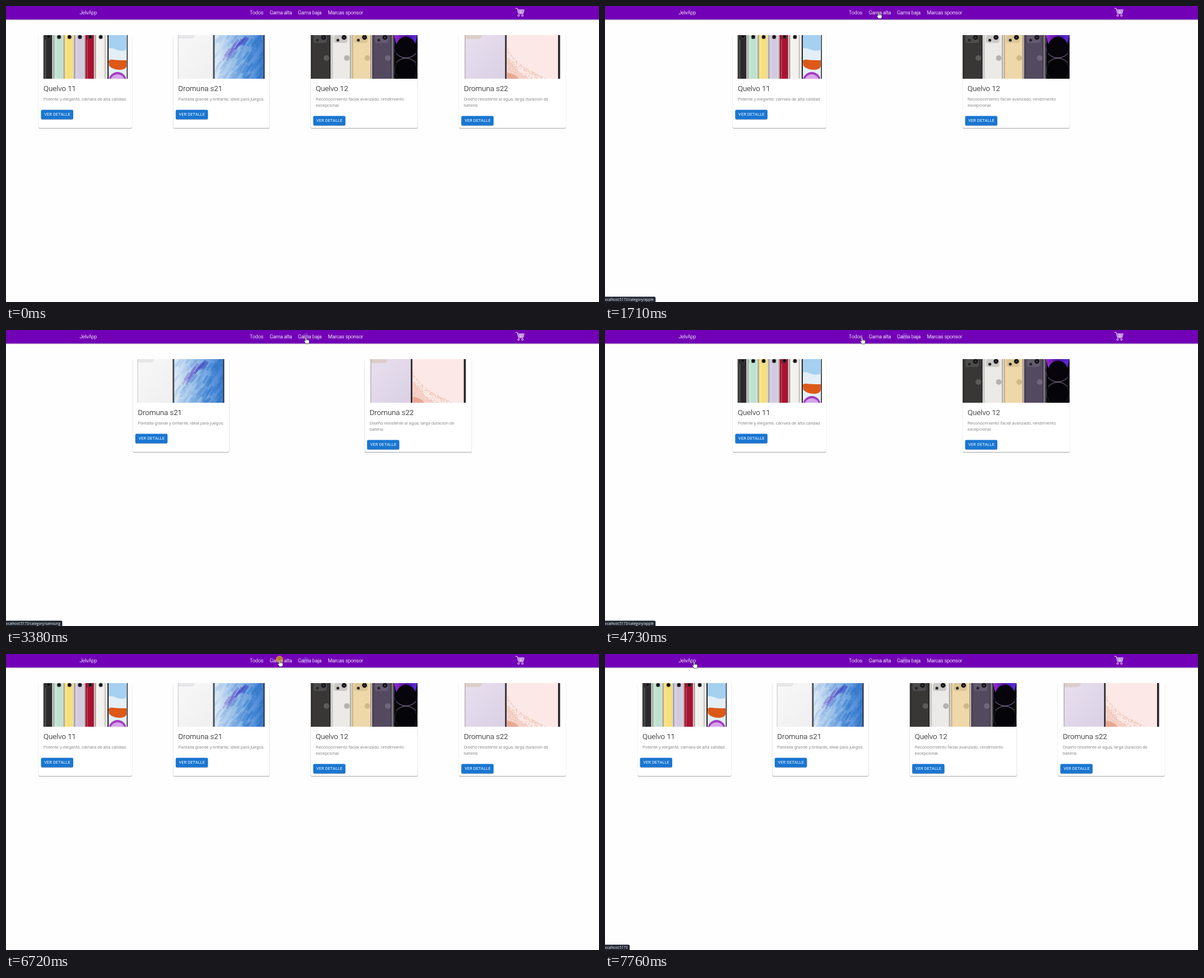
Write an HTML page that moves like this. It is 1058x529 px and loops after 8000 ms.

```html
<!DOCTYPE html>
<html lang="es">
<head>
<meta charset="utf-8">
<style>
  html, body { margin: 0; width: 100%; height: 100%; overflow: hidden; background: #fefefe; }
  #stage { display: block; width: 1058px; height: 529px; font-family: Roboto, sans-serif; font-weight: 300; }
  .title { font-size: 13.29px; fill: #181818; stroke: #181818; stroke-width: .08px; }
  .desc { font-size: 7.75px; letter-spacing: .01071em; fill: #555; }
  .button { font-size: 7.2px; font-weight: 400; letter-spacing: .02857em; fill: #fff; }
  .nav { font-size: 8.86px; fill: #fff; stroke: #fff; stroke-width: .16px; }
  .status { font: 400 6.3px "Open Sans", "Noto Sans", sans-serif; fill: #fff; }
</style>
</head>
<body>
<svg id="stage" viewBox="0 0 1058 529"></svg>
<script>
const $ = id => document.getElementById(id);
const rect = (x, y, w, h, fill, extra = '') => `<rect x="${x}" y="${y}" width="${w}" height="${h}" fill="${fill}" ${extra}/>`;
const circle = (x, y, r, fill, extra = '') => `<circle cx="${x}" cy="${y}" r="${r}" fill="${fill}" ${extra}/>`;
const path = (d, fill, extra = '') => `<path d="${d}" fill="${fill}" ${extra}/>`;
const text = (x, y, cls, str) => `<text x="${x}" y="${y}" class="${cls}">${str}</text>`;
const gradient = (id, dir, ...stops) => `<linearGradient id="${id}" ${dir}>` +
  stops.map((c, i) => `<stop offset="${i / (stops.length - 1)}" stop-color="${c}"/>`).join('') + '</linearGradient>';
const repeat = (n, make) => Array.from({ length: n }, (_, i) => make(i)).join('');

let seed = 7;
const random = () => (seed = seed * 16807 % 2147483647) / 2147483647;

// Product pictures, in card coordinates.
function colorRow() {
  const colors = ['#2b2b2d', '#bde2d1', '#f5e07c', '#d2cae1', '#a81233', '#f3f1ee'];
  return rect(8, 0, 151, 78, '#f4f2f0') + colors.map((color, i) => {
    const x = 9.5 + i * 18.6;
    return rect(x - 1.5, 0, 18.6, 78, '#a39b93') + rect(x, 0, 15, 78, color) +
      rect(x + 2.5, 8, 1.2, 70, '#fff', 'opacity=".3"') + rect(x + 15, 0, 1.2, 78, '#efece8') +
      rect(x + 5, 0, 7, 7, '#3b383a', 'rx="3"') + circle(x + 8.5, 3, 2.4, '#0b0b0d');
  }).join('') + rect(123, 0, 36, 78, '#17181c') + rect(125, 0, 32.5, 78, '#e3eef5') +
    path('M125 0H157.5V26Q148 30 139 26T125 24Z', '#a5d0f0') +
    path('M125 47Q126 43 133 44T157 45V56Q155 62 144 62T126 55Z', '#dc5918') +
    circle(141, 82, 16, '#a33bc0') + circle(141, 83, 13, '#d6a4e8');
}

function blueScreen() {
  const strokes = repeat(150, () => {
    const x = 75 + 92 * random(), y = 84 * random() - 6;
    const u = Math.min(1, Math.max(0, (x - 82 + y * .15) / 70));
    const violet = Math.max(0, 1 - Math.abs(x + y - 128) / 16) * (y < 45);
    const light = 88 - 38 * u - 12 * violet + 12 * (random() - .5);
    return path(`M${x.toFixed(1)} ${y.toFixed(1)}l-9 13`, 'none',
      `stroke="hsl(${212 + 40 * violet} ${62 - 15 * violet}% ${light}%)" stroke-width="4" opacity=".55"`);
  });
  return rect(8.5, 0, 62.5, 78, 'url(#white)') + rect(74, 0, 88, 78, 'url(#blue)') +
    `<g clip-path="url(#screen)">${strokes}</g>` +
    path('M9 0H38Q38 6 32 6H9Z', '#e6e6e8') + rect(8.3, 0, 1, 78, '#c2c4c8') +
    rect(71, 0, 3, 78, '#4a4e55') + rect(161, 0, 2.2, 78, '#30353f');
}

function darkRow() {
  const colors = ['#383736', '#eceae7', '#eed7a9', '#544a60'];
  const marks = ['#5c5b5a', '#b4b2b0', '#cfb889', '#71677d'];
  const ring = 'stroke="#b9aec6" stroke-width=".6"';
  return rect(0, 0, 191, 78, '#f7f6f5') + colors.map((color, i) => {
    const x = i * 36.5;
    return rect(x, 0, 35.5, 78, color) + rect(x + 33.5, 0, 2, 78, '#000', 'opacity=".3"') +
      rect(x, 0, 3, 78, '#000', 'opacity=".15"') + rect(x + 5, 0, 24, 14, marks[i], 'rx="4" opacity=".6"') +
      circle(x + 12, 9, 2.6, '#27262a') + circle(x + 23, 4, 4.4, '#141417') +
      circle(x + 23, 4, 1.6, '#45434f') + circle(x + 28, 41, 5, marks[i]);
  }).join('') + rect(146, 0, 2, 78, '#2a2530') + rect(148.5, 0, 42.2, 78, '#050408') +
    path('M149 0H190Q187 20 180 24Q170 2 160 24Q152 20 149 0Z', 'url(#violet)') +
    circle(170, 20, 17, '#07040c') + circle(170, 19, 21.5, 'none', 'stroke="#5b2b9c" stroke-width=".6"') +
    path('M152 33Q170 49 188 33M152 49Q170 33 188 49', 'none', ring) +
    circle(170, 62, 20, 'none', 'stroke="#3c3742" stroke-width=".7"');
}

function pinkScreen() {
  const grain = repeat(300, () => {
    const u = random(), edge = 78 * (.25 + .85 * Math.sqrt(u));
    const y = edge + 45 * random() * random() - 4;
    return y < 78 ? rect((86 + 80 * u).toFixed(1), y.toFixed(1), 1, 1, random() < .6 ? '#e5a892' : '#cfb08c') : '';
  });
  return rect(9.5, 0, 172, 78, '#f6f3f6') + rect(12, 0, 71, 78, 'url(#lilac)') +
    path('M11 0H41Q41 7 34 7H11Z', '#dccdc9') + rect(10.5, 0, 1.5, 78, '#b6adb7') +
    rect(82.5, 0, 3, 78, '#2c2629') + rect(85.5, 0, 91.5, 78, '#fce8e6') +
    path('M86 38Q95 51 103 60T125 78H86Z', '#f4c4b4', 'opacity=".6"') +
    path('M86 67Q100 69 107 78H86Z', '#e08a70', 'opacity=".6"') + grain +
    rect(177, 0, 3.6, 78, '#282427');
}

const cards = [
  { w: 167, group: 'high', art: colorRow, name: 'Quelvo 11', lines: ['Potente y elegante, cámara de alta calidad.'] },
  { w: 172, group: 'low', art: blueScreen, name: 'Dromuna s21', lines: ['Pantalla grande y brillante, ideal para juegos.'] },
  { w: 191, group: 'high', art: darkRow, name: 'Quelvo 12', lines: ['Reconocimiento facial avanzado, rendimiento', 'excepcional.'] },
  { w: 191, group: 'low', art: pinkScreen, name: 'Dromuna s22', lines: ['Diseño resistente al agua, larga duración de', 'batería.'] }
];

function cardMarkup({ w, art, name, lines }) {
  const top = 122.5 + lines.length * 11;
  return '<g class="product">' + rect(-.6, .4, w + 1.2, 166.6, '#000', 'rx="2.4" opacity=".07"') +
    rect(0, 1, w, 166, '#000', 'rx="2.2" opacity=".3"') + rect(0, 0, w, 166, '#fff', 'rx="2.2"') +
    `<svg width="${w}" height="78">${art()}</svg>` + text(9, 100, 'title', name) +
    lines.map((line, i) => text(9, 116.5 + i * 11, 'desc', line)).join('') +
    rect(4.5, top + .8, 57.4, 17, '#000', 'rx="2.2" opacity=".3"') +
    rect(4.5, top, 57.4, 17, '#1976d2', 'rx="2.2"') + text(10.2, top + 10.9, 'button', 'VER DETALLE') + '</g>';
}

const thin = 'stroke="#fff" stroke-width=".9"';
const cart = path('M909 4.2H912L914.5 13.8H922.5L924.4 6.8H912.8M913.4 9.1H923.6M914 11.4H923', 'none', thin) +
  path('M916 7L917 13.5M918.6 7V13.5M921.3 7L920.4 13.5', 'none', thin) +
  circle(914.6, 17, 1.5, 'none', thin) + circle(921.4, 17, 1.5, 'none', thin);

const address = 'localhost:5173';
const links = {
  logo: { x: 131.5, label: 'JelvApp', width: 33, spot: [159, 13], page: 'all', url: address },
  all: { x: 435, label: 'Todos', width: 25, spot: [458.5, 12.5], page: 'all', url: address },
  high: { x: 470.5, label: 'Gama alta', width: 40, spot: [488, 10], page: 'high', url: address + '/category/apple' },
  low: { x: 521, label: 'Gama baja', width: 43, spot: [535, 12], page: 'low', url: address + '/category/samsung' },
  sponsor: { x: 574.5, label: 'Marcas sponsor', width: 63 }
};

$('stage').innerHTML = '<defs>' +
  gradient('white', 'x1="0" y1="0" x2="1" y2="1"', '#f8f8f8', '#efeff0') +
  gradient('blue', 'x1="0" y1="0" x2="1" y2="0"', '#dfebf5', '#8cb9e6', '#3f7cd4') +
  gradient('violet', 'x1="0" y1="0" x2="1" y2="0"', '#a12be0', '#4d1295', '#5b2bee') +
  gradient('lilac', 'x1="0" y1="0" x2="1" y2="1"', '#e8dfee', '#dad0e5') +
  gradient('shade', 'x1="0" y1="0" x2="0" y2="1"', 'rgba(0,0,0,.22)', 'rgba(0,0,0,0)') +
  `<clipPath id="screen">${rect(74, 0, 87, 78, '#fff')}</clipPath></defs>` +
  rect(0, 0, 1058, 529, '#fefefe') + cards.map(cardMarkup).join('') +
  rect(0, 24, 1058, 2.6, 'url(#shade)') + rect(0, 0, 1058, 24.2, '#7200b6') +
  Object.values(links).map(({ x, label }) => text(x, 14.6, 'nav', label)).join('') + cart +
  circle(535, 11.5, 6, '#b9a0ff', 'id="trace" opacity=".22"') +
  '<g id="status"><path fill="#202631"/>' + text(-2, 527, 'status', '') + '</g>' +
  circle(0, 0, 6.5, '#e6be00', 'id="press" opacity=".65"') +
  '<g id="pointer" stroke="#111" stroke-width=".6" stroke-linejoin="round">' +
  path('M0 0V9.4L2.2 7.4 3.7 10.8 5.1 10.2 3.6 6.9H6.7Z', '#fff', 'id="arrow"') +
  '<g id="hand">' + path('M-1 1Q-1 0 0 0T1 1V5Q2 4.4 2.7 5.2 3.8 4.7 4.4 5.6 6 5.2 6 6.8V9Q6 11 4.8 12.4H-.3Q-1 10.6-2.8 8.4-3.4 7.2-2.6 6.8-1.8 6.6-1 7.8Z', '#fff') +
  path('M1 5V6.8M2.7 5.3V6.9M4.4 5.7V7', 'none') + '</g></g>';

const products = [...document.querySelectorAll('.product')];

const visit = (link, arrive, leave, press = Infinity) => ({ ...links[link], arrive, leave, press });
const visits = [
  visit('high', 1180, 1840, 1300), visit('all', 2060, 2740, 2400), visit('low', 2950, 3580, 3170),
  visit('high', 3800, 4480, 4260), visit('all', 4700, 5620, 5290), visit('logo', 6050, 6400),
  visit('high', 6700, 7280, 6700), visit('logo', 7500, 8300, 7560)
];
const pressTime = 130, loadDelay = 70, showDelay = 80, hideDelay = 300;

const mix = (a, b, u) => a.map((v, i) => v + (b[i] - v) * u);
const progress = (t, from, to) => Math.min(1, Math.max(0, (t - from) / (to - from)));
const ease = u => u * u * (3 - 2 * u);
const show = (node, on) => node.style.display = on ? '' : 'none';

// The pointer sweeps in along a curve, then goes from link to link.
function pointerAt(t) {
  const next = visits.findIndex(({ arrive }) => t < arrive);
  if (next < 0) return visits.at(-1).spot;
  if (next > 0) {
    const from = visits[next - 1];
    return mix(from.spot, visits[next].spot, ease(progress(t, from.leave, visits[next].arrive)));
  }
  const u = progress(t, 180, 950), bend = [-200, 200], end = [470, 38];
  const entry = mix(mix([996, 496], bend, u), mix(bend, end, u), u);
  return mix(entry, visits[0].spot, progress(t, 1020, visits[0].arrive));
}

// Cards share the free width evenly, each with its own margin.
function placeCards(page) {
  const margin = 15.25;
  const shown = cards.filter(({ group }) => page == 'all' || page == group);
  const used = shown.reduce((sum, { w }) => sum + w + 2 * margin, 0);
  const gap = (1057 - used) / (shown.length + 1);
  let x = gap + margin;
  cards.forEach((card, i) => {
    show(products[i], shown.includes(card));
    if (!shown.includes(card)) return;
    products[i].setAttribute('transform', `translate(${x} 52)`);
    x += card.w + gap + 2 * margin;
  });
}

function drawStatus(t) {
  const hovered = visits.findLast(({ arrive }) => t >= arrive + showDelay);
  const visible = hovered && t < hovered.leave + hideDelay;
  show($('status'), visible);
  if (!visible) return;
  const [box, label] = $('status').children;
  label.textContent = hovered.url;
  box.setAttribute('d', `M0 519.4H${label.getComputedTextLength() - .5}q2 0 2 2V529H0Z`);
}

function draw(t) {
  const [x, y] = pointerAt(t);
  const overLink = y < 17.5 && Object.values(links).some(link => x >= link.x && x <= link.x + link.width);
  placeCards(visits.findLast(({ press }) => t >= press + loadDelay)?.page ?? 'all');
  drawStatus(t);
  show($('pointer'), t >= 180);
  show($('hand'), overLink);
  show($('arrow'), !overLink);
  $('pointer').setAttribute('transform', `translate(${x} ${y})`);
  show($('press'), visits.some(({ press }) => t >= press && t < press + pressTime));
  $('press').setAttribute('cx', x);
  $('press').setAttribute('cy', y - .5);
  show($('trace'), t >= 3310);
}

const began = performance.now();
function tick() {
  draw((performance.now() - began) % 8000);
  requestAnimationFrame(tick);
}
tick();
</script>
</body>
</html>
```
